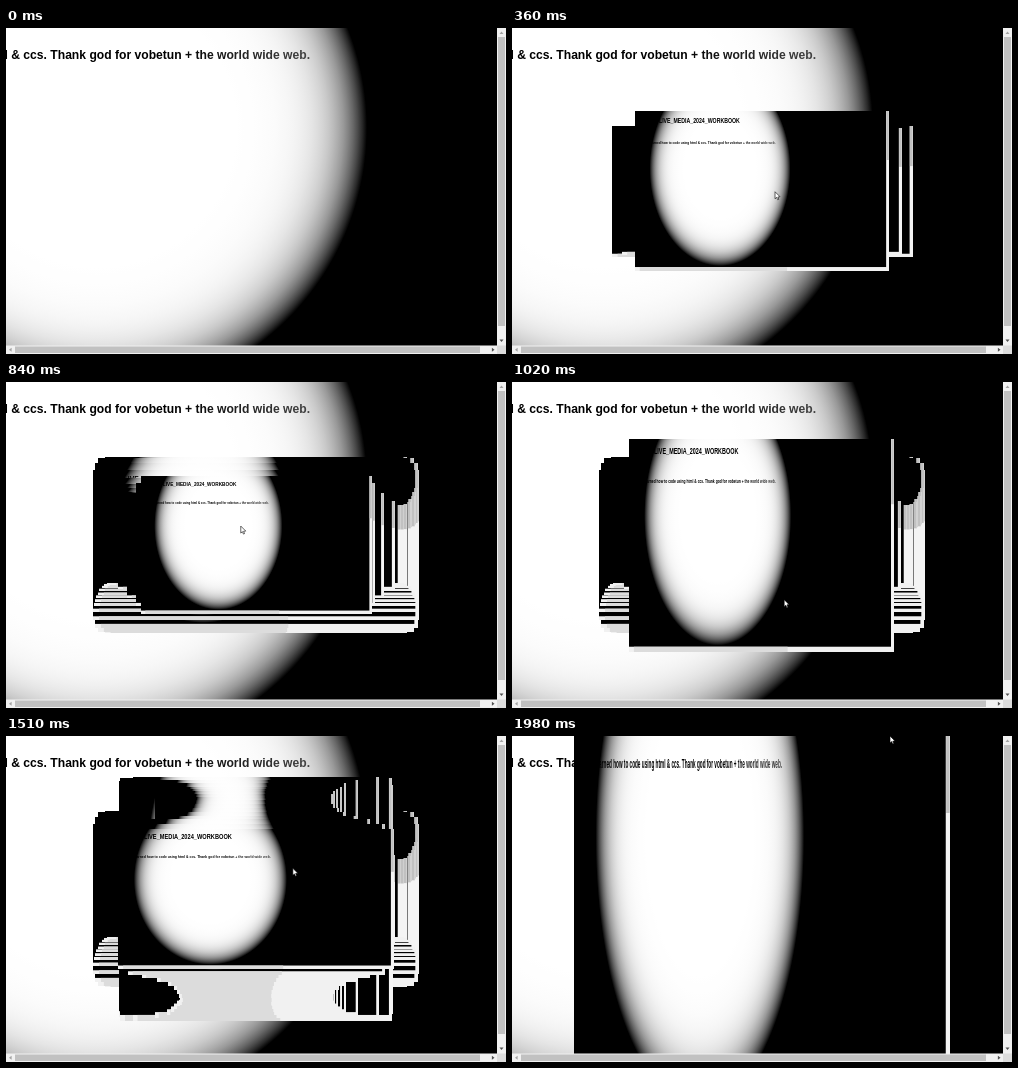
Animation of 500x326 px, one loop 2.48 s. Source, as an HTML page with a canvas:

```html
<!DOCTYPE html>
<html lang="en">
<head>
<meta charset="utf-8">
<title>Stretching page trail</title>
<style>
  html, body { margin: 0; width: 100%; height: 100%; overflow: hidden; background: #000; }
  canvas { display: block; width: 500px; height: 326px; }
</style>
</head>
<body>
<canvas id="stage" width="500" height="326"></canvas>
<script>
const ctx = document.getElementById('stage').getContext('2d');
const LOOP = 2480, FIRST_STEP = 155, STEP = 96.2, LAST_STEP = 18, FINALE = 1980;
const COPIES = 4;          // window copies left behind per step
const CURSOR_LEAD = 0.15;  // the pointer runs ahead of the window, in steps
const PAGE = { w: 974, h: 444 };
const CENTER = { x: 250, y: 163 };
const FONT = '"Liberation Sans", Arial, sans-serif';
const TITLE = 'LIVE_MEDIA_2024_WORKBOOK';
const LINE = 'I have learned how to code using html & ccs. Thank god for vobetun + the world wide web.';

// Turning points of the drag: step, window width, window height.
const PATH = [
  [0, 301, 131], [1, 280, 127], [2, 254, 160], [3, 316, 174], [4, 325, 122],
  [6, 290, 80], [7, 231, 138], [10, 272, 243], [10.6, 190, 236], [11, 171, 225],
  [12, 153, 205], [13, 177, 174], [14, 276, 140], [16, 324, 28], [18, 358, 8]
];

const moonFill = ctx.createRadialGradient(326, 160, 0, 326, 160, 270);
for (let i = 0; i <= 30; i++) {
  const r = Math.sqrt(i / 30), v = Math.round(255 * (1 - r ** 10));
  moonFill.addColorStop(r, `rgb(${v},${v},${v})`);
}
const lineFill = ctx.createLinearGradient(400, 0, 538, 0);
lineFill.addColorStop(0, '#000');
lineFill.addColorStop(1, '#444');

function box(color, x, y, w, h) {
  ctx.fillStyle = color;
  ctx.fillRect(x, y, w, h);
}

function label(text, size, color, right, baseline) {
  ctx.font = `bold ${size}px ${FONT}`;
  ctx.textAlign = 'right';
  ctx.fillStyle = color;
  ctx.fillText(text, right, baseline);
}

function drawPage(x, y, w, h) {
  ctx.save();
  ctx.translate(x, y);
  ctx.scale(w / PAGE.w, h / PAGE.h);
  ctx.beginPath();
  ctx.rect(0, 0, PAGE.w, PAGE.h);
  ctx.clip();
  box('#000', 0, 0, PAGE.w, PAGE.h);
  box(moonFill, 0, 0, 600, PAGE.h);
  label(TITLE, 20, '#000', 402, 32);
  label(LINE, 12.13, lineFill, 539, 91);
  box('#f4f4f4', 963, 0, 11, PAGE.h);
  box('#c1c1c1', 964, 0, 9, 136);
  box('#f1f1f1', 0, 433, PAGE.w, 11);
  box('#dcdcdc', 18, 433, 565, 11);
  ctx.restore();
}

function stamp([w, h]) {
  const x = Math.round(CENTER.x - w / 2), y = Math.round(CENTER.y - h / 2);
  drawPage(x, y, Math.round(w), Math.max(1, Math.round(h)));
}

// Smooth curve through the turning points.
function sizeAt(pos) {
  const end = PATH.length - 1;
  const i = Math.max(0, Math.min(end - 1, PATH.findIndex(p => p[0] > pos) - 1));
  const from = pos >= PATH[end][0] ? end - 1 : i;
  const a = PATH[from], b = PATH[from + 1], span = b[0] - a[0];
  const u = Math.min(1, (pos - a[0]) / span);
  const slope = (k, c) => {
    const p = PATH[Math.max(0, k - 1)], q = PATH[Math.min(end, k + 1)];
    return span * (q[c] - p[c]) / (q[0] - p[0]);
  };
  const ease = u * u * (3 - 2 * u);
  return [1, 2].map(c => a[c] + (b[c] - a[c]) * ease
    + u * (1 - u) * ((1 - u) * slope(from, c) - u * slope(from + 1, c)));
}

function arrow(color, x, y, dx, dy) {
  ctx.fillStyle = color;
  ctx.beginPath();
  ctx.moveTo(x + 1.3 * dx, y + 1.3 * dy);
  ctx.lineTo(x - 1.3 * dx + 2 * dy, y - 1.3 * dy + 2 * dx);
  ctx.lineTo(x - 1.3 * dx - 2 * dy, y - 1.3 * dy - 2 * dx);
  ctx.fill();
}

function drawScrollbars() {
  box('#f1f1f1', 491, 0, 9, 326);
  box('#f1f1f1', 0, 317.5, 500, 8.5);
  box('#dcdcdc', 491, 317.5, 9, 8.5);
  box('#c1c1c1', 492, 9, 7, 289);
  box('#c1c1c1', 9, 318.5, 465, 6.5);
  arrow('#a3a3a3', 495.5, 4.8, 0, -1);
  arrow('#505050', 495.5, 312.7, 0, 1);
  arrow('#a3a3a3', 4.3, 321.8, -1, 0);
  arrow('#505050', 487.2, 321.8, 1, 0);
}

const pointer = new Path2D('M0 0V7L1.6 5.6L2.7 8L3.8 7.5L2.8 5.2L5 5Z');

function drawCursor(x, y) {
  ctx.save();
  ctx.translate(x, y);
  ctx.fillStyle = '#fff';
  ctx.fill(pointer);
  ctx.lineWidth = 0.6;
  ctx.stroke(pointer);
  ctx.restore();
}

function draw(step) {
  drawPage(-235, -60, PAGE.w, PAGE.h);
  for (let k = 0; k <= Math.min(step, LAST_STEP); k++) {
    const copies = k < 3 ? 1 : COPIES; // the drag starts in single jumps
    for (let j = 1; j <= copies; j++) stamp(sizeAt(k - 1 + j / copies));
  }
  if (step > LAST_STEP) {
    stamp([376, 444]);
    drawCursor(378, 0);
  } else if (step >= 0) {
    const [x, y] = sizeAt(step + CURSOR_LEAD);
    drawCursor(x + 4, y);
  }
  drawScrollbars();
}

function stepAt(t) {
  if (t >= FINALE) return LAST_STEP + 1;
  return Math.min(LAST_STEP, Math.floor((t - FIRST_STEP) / STEP));
}

const start = performance.now();
let shown = null;

function tick() {
  const step = stepAt((performance.now() - start) % LOOP);
  if (step !== shown) draw(shown = step);
  requestAnimationFrame(tick);
}
tick();
</script>
</body>
</html>
```
